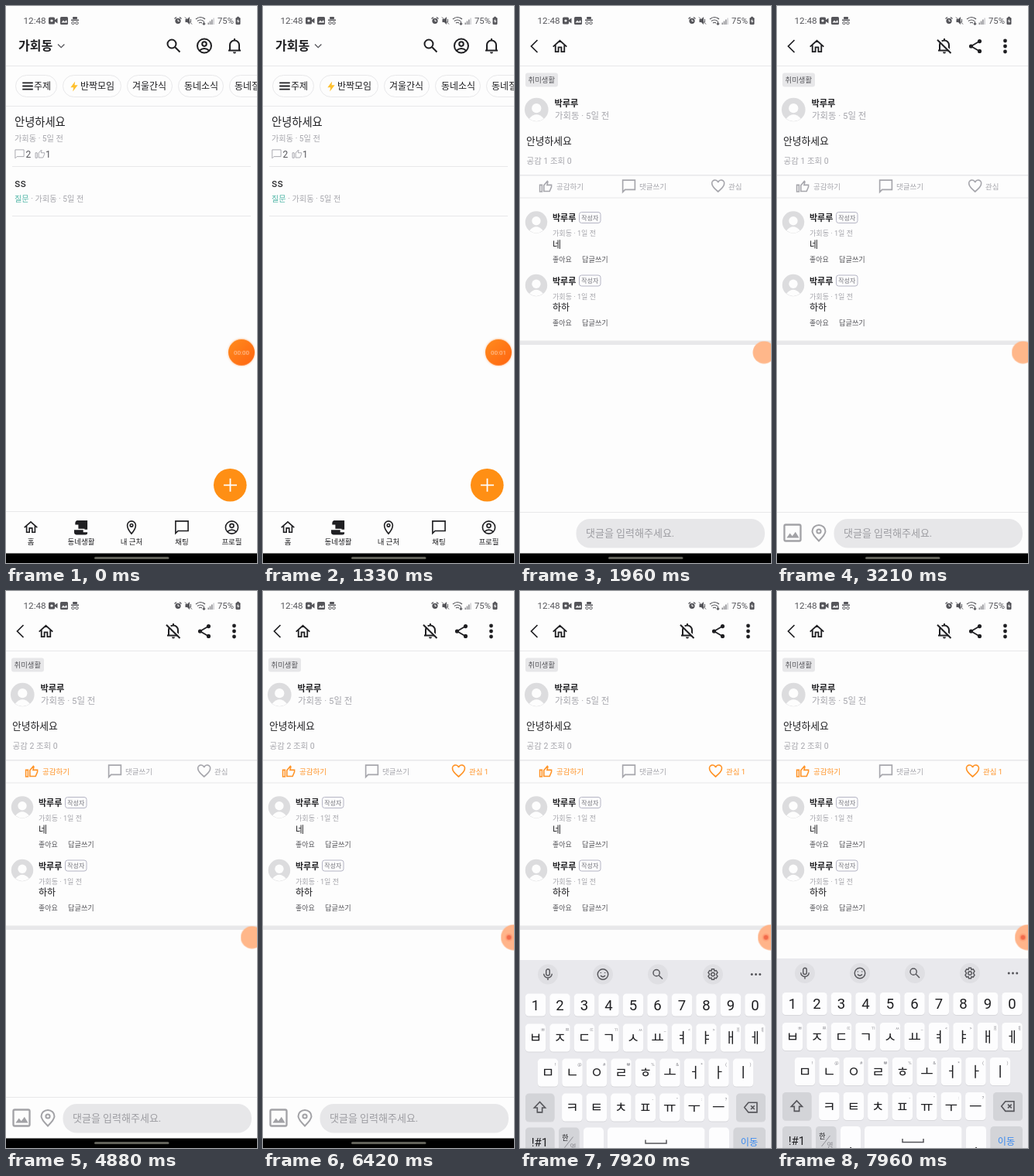
Animation of 324 by 720 pixels, one loop 8 s. Source, as an HTML page:

```html
<!DOCTYPE html>
<html lang="ko">
<head>
<meta charset="utf-8">
<style>
html, body { margin: 0; width: 100%; height: 100%; overflow: hidden; background: #fdfdfd; }
svg { display: block; width: 324px; height: 720px; }
text { font-family: Roboto, "Noto Sans CJK KR", "Noto Sans CJK", sans-serif; white-space: pre; }
</style>
</head>
<body>
<svg id="stage" viewBox="0 0 324 720"></svg>
<script>
const LOOP = 8000;
const BG = '#fdfdfd', INK = '#1f1f22', DIM = '#55555a', MUTE = '#a6a6ac', LINE = '#e8e8ea', PILL = '#e7e7e9', ORANGE = '#ff9326';
const NAME = '박루루';

// ---- drawing helpers ----
const text = (x, y, size, str, fill = INK, weight = 400, anchor = 'start') =>
  `<text x="${x}" y="${y}" font-size="${size}" fill="${fill}" font-weight="${weight}" text-anchor="${anchor}">${str}</text>`;
const box = (x, y, w, h, fill, r = 0, more = '') =>
  `<rect x="${x}" y="${y}" width="${w}" height="${h}" rx="${r}" fill="${fill}" ${more}/>`;
const disc = (x, y, r, fill, more = '') => `<circle cx="${x}" cy="${y}" r="${r}" fill="${fill}" ${more}/>`;
const path = (d, more = '') => `<path d="${d}" ${more}/>`;
const group = (id, body, more = '') => `<g id="${id}" ${more}>${body}</g>`;
const rule = (y, x = 0, w = 324, h = 1) => box(x, y, w, h, LINE);

// Icons live on a 24 unit grid and are stroked with the current colour.
const SOLID = 'fill="currentColor" stroke="none"';
const BELL = path('M6 18V11a6 6 0 0 1 12 0v7M4 18h16M12 2.5v2.5') + path('M10 20h4a2 2 0 0 1-4 0z', SOLID);
const ICONS = {
  search: disc(9.5, 9.5, 5.5, 'none') + path('M13.8 13.8 20 20'),
  user: disc(12, 12, 9, 'none') + disc(12, 9.6, 2.8, 'none') + path('M5.6 18.2Q12 12.8 18.4 18.2'),
  bell: BELL,
  bellOff: BELL + path('M4.5 3.2 21.5 20.2', `stroke="${BG}"`) + path('M3 4.2 20.5 21.5'),
  home: path('M2.8 12.2 12 4l9.2 8.2M6 10v9h4v-6h4v6h4v-9'),
  pin: path('M12 21C8 16.5 6 12.5 6 9a6 6 0 0 1 12 0c0 3.5-2 7.5-6 12z') + disc(12, 9, 2, 'none'),
  bigPin: path('M12 22C6.5 16.5 3.5 13 3.5 9.5a8.5 8 0 0 1 17 0c0 3.5-3 7-8.500 12.500z') + disc(12, 9.5, 2.6, 'none'),
  chat: path('M3 3h18v14H6.5L3 20.5z'),
  thumb: path('M2.5 10h3.5v10.5H2.5zM9 10.5 14.5 4l.8.8-1.3 5.2h7v3l-3 7H9z'),
  heart: path('M12 20C5 14 3 11.5 3 8.5A4.6 4.6 0 0 1 12 6.5 4.6 4.6 0 0 1 21 8.5C21 11.5 19 14 12 20z'),
  image: box(3, 3, 18, 18, 'none', 1.5) + path('M5.5 17.5l3.7-5 2.6 3.2 3.5-4.7 4 6.5z', SOLID),
  share: path('M18 5 6 12l12 7') + [[18, 5], [6, 12], [18, 19]].map(([x, y]) => disc(x, y, 2.8, 'currentColor', 'stroke="none"')).join(''),
  more: [5, 12, 19].map(y => disc(12, y, 2.4, 'currentColor', 'stroke="none"')).join(''),
  dots: [5, 12, 19].map(x => disc(x, 12, 2, 'currentColor', 'stroke="none"')).join(''),
  menu: path('M3 6.5h18M3 12h18M3 17.5h18'),
  bolt: path('M14 1 4 14h6.5L9 23 20 9h-7z', SOLID),
  scroll: path('M6 2h15v13h-4v-1H8V8H3.5Q3 3 6 2zM2 15.5h13V19h6v1q0 2.5-3 2.5H5Q2 22 2 19z', SOLID),
  mic: box(9, 3, 6, 11, 'none', 3) + path('M5 11a7 7 0 0 0 14 0M12 18v4'),
  smile: disc(12, 12, 9, 'none') + path('M8 14q4 4.5 8 0M8.5 8.5v1.5M15.5 8.5v1.5'),
  gear: path('M10 3h4l.7 3 3-.8 2.3 3.6L17.8 12l2.2 3.2-2.3 3.6-3-.8-.7 3h-4l-.7-3-3 .8L4 15.2 6.2 12 4 8.8l2.3-3.6 3 .8z') + disc(12, 12, 3, 'none'),
  shift: path('M12 3 3 12.5h5V20h8v-7.5h5z'),
  erase: path('M8 4h14v16H8L1.5 12zM12 9l6 6M18 9l-6 6')
};
const icon = (name, cx, cy, size = 24, color = INK, width = 2) => {
  const k = size / 24;
  return `<g transform="translate(${cx - 12 * k} ${cy - 12 * k}) scale(${k})" color="${color}" stroke="currentColor" fill="none" stroke-width="${width}">${ICONS[name]}</g>`;
};

// ---- shared chrome ----
function statusBar() {
  const c = DIM;
  return text(22.5, 22.8, 11.7, '12:48', c)
    + box(55, 14.5, 8, 9, c, 1.5) + path('M63 18l3.5-2.5v7L63 20z', `fill="${c}"`) + disc(59, 19, 1.6, BG)
    + box(70, 14, 10, 10, c, 1.5) + path('M71.5 21.5l2.5-3 2 2 2-2.5 1 3.5z', `fill="${BG}"`)
    + box(84, 17.5, 10, 1.5, c) + box(86, 14, 6, 3, c, 1) + disc(86.5, 22, 1.7, 'none', `stroke="${c}"`) + disc(91.5, 22, 1.7, 'none', `stroke="${c}"`)
    + disc(222, 19.3, 3.6, c) + path('M217.5 16.5l2.5-2M226.5 16.5l-2.5-2', `stroke="${c}" fill="none" stroke-width="1.300"`) + path('M222 17.3v2.200h1.800', `stroke="${BG}" fill="none"`)
    + path('M231.5 17h2.5l3-3v10l-3-3h-2.5z', `fill="${c}"`) + path('M231 14.5l9 9M238.5 17v4', `stroke="${c}" fill="none"`)
    + path('M245 17q6-5 12 0M247 19.5q4-3 8 0M249 22q2-1.5 4 0M255.5 20v4M253.8 22.5l1.7 1.7 1.7-1.7', `stroke="${c}" fill="none" stroke-width="1.2"`)
    + [0, 1, 2, 3].map(i => box(260.5 + i * 2.3, 21.5 - i * 2, 1.5, 2.5 + i * 2, i < 3 ? '#8b8b90' : '#cfcfd2')).join('')
    + text(273, 22.8, 11.3, '75%', c)
    + box(296.5, 15, 6, 9, c, 1.2) + box(298.2, 13.8, 2.6, 1.5, c) + path('M300 16l-2 4h1.5l-.5 3 2.2-4h-1.5z', `fill="${BG}"`);
}

// ---- list page ----
function listPage() {
  const chips = [[12, 54, 36, '주제'], [73, 76, 96, '반짝모임'], [156, 59, 163, '겨울간식'], [222, 59, 230, '동네소식'], [288, 59, 295, '동네질문']];
  const tabs = [['home', 32, '홈'], ['scroll', 97, '동네생활'], ['pin', 162, '내 근처'], ['chat', 227, '채팅'], ['user', 291.5, '프로필']];
  const place = '가회동 · 5일 전';
  return box(0, 30, 324, 678, BG)
    + text(16, 57, 16, '가회동', INK, 700)
    + path('M67 49.5l4.2 4.2 4.2-4.2', `fill="none" stroke="${DIM}" stroke-width="1.3"`)
    + icon('search', 216.5, 51.5) + icon('user', 256, 51.5) + icon('bell', 295, 51.5)
    + rule(77)
    + chips.map(([x, w, tx, s]) => box(x + .5, 89.5, w - 1, 28, BG, 14, `stroke="${LINE}"`) + text(tx, 108, 12, s)).join('')
    + icon('menu', 28, 103.5, 18, INK, 2.4) + icon('bolt', 88, 104, 14, '#ffc02e')
    + rule(129)
    + text(11, 155, 14.3, '안녕하세요') + text(11, 175, 10.2, place, MUTE)
    + icon('chat', 17.5, 191.5, 15, MUTE, 1.5) + text(25.5, 195.5, 12, '2', DIM)
    + icon('thumb', 44, 191, 15, MUTE, 1.5) + text(51, 195.5, 12, '1', DIM)
    + rule(207, 8, 308)
    + text(11, 233.5, 14.5, 'ss') + text(11, 252.5, 10.2, `<tspan fill="#4fb5a6">질문</tspan> · ${place}`, MUTE)
    + rule(271, 8, 308)
    + disc(289.3, 619.3, 21.3, '#ff8f14') + path('M281 619.3h17M289.5 610.8v17', `stroke="${BG}" stroke-width="1.8"`)
    + rule(653)
    + tabs.map(([n, x, s]) => icon(n, x, 674, 21.6, INK, 1.8) + text(x, 696, 9.5, s, INK, 400, 'middle')).join('');
}

// ---- detail page ----
const avatar = (x, y, r) => disc(x, y, r, '#dcdcde') + disc(x, y - r * .12, r * .4, BG)
  + path(`M${x - r * .62} ${y + r * .76}Q${x} ${y + r * .05} ${x + r * .62} ${y + r * .76}Q${x} ${y + r * 1.2} ${x - r * .62} ${y + r * .76}z`, `fill="${BG}"`);

const comment = (dy, body) => `<g transform="translate(0 ${dy})">`
  + avatar(21, 279.5, 14.2) + text(42, 278, 11, NAME, INK, 700)
  + box(76.5, 266.5, 27.5, 14, BG, 3, 'stroke="#b4b4c4"') + text(90.3, 276.5, 8, '작성자', '#77777f', 400, 'middle')
  + text(42, 297, 9.1, '가회동 · 1일 전', MUTE) + text(42, 312.5, 12, body)
  + text(42, 331, 9, '좋아요', DIM, 500) + text(80, 331, 9.2, '답글쓰기', DIM, 500) + '</g>';

const action = (name, x, tx, label, color, size = 21) => icon(name, x, 233, size, color, 1.9) + text(tx, 236.7, 9.5, label, color);

function detailPage() {
  const count = n => text(8.5, 204, 10.5, `공감 ${n} 조회 0`, MUTE);
  const hint = '댓글을 입력해주세요.';
  const TOOL = '#a2a2a6';
  return box(0, 30, 324, 678, BG)
    + path('M22.5 44l-8 8 8 8', `fill="none" stroke="${INK}" stroke-width="1.7"`)
    + icon('home', 51.5, 52.5, 23, INK, 1.9)
    + group('tools', icon('bellOff', 216, 51.5) + icon('share', 256, 52, 22, INK, 1.9) + icon('more', 294.5, 52))
    + rule(77)
    + box(7, 86.5, 42, 18, PILL, 3) + text(10.5, 99, 9.4, '취미생활', DIM, 500)
    + avatar(21.3, 134, 15.3) + text(44.5, 130, 11.2, NAME, INK, 700) + text(45, 146.3, 11.4, '가회동 · 5일 전', MUTE)
    + text(8, 179, 12.8, '안녕하세요')
    + group('count1', count(1)) + group('count2', count(2))
    + rule(218, 0, 324, 1.5) + rule(247.5)
    + group('likeOff', action('thumb', 33.3, 47, '공감하기', MUTE, 19.5))
    + group('likeOn', action('thumb', 33.3, 47, '공감하기', ORANGE, 19.5))
    + action('chat', 140.5, 154, '댓글쓰기', MUTE)
    + group('heartOff', action('heart', 255.7, 269, '관심', MUTE))
    + group('heartOn', action('heart', 252.5, 266, '관심 1', ORANGE))
    + comment(0, '네') + comment(81.5, '하하')
    + rule(432.5, 0, 324, 5.5)
    + rule(654)
    + group('field', box(73.5, 663, 243.5, 37.5, PILL, 18) + text(86, 686.3, 13, hint, '#9d9da2'))
    + group('attach', icon('image', 20, 681, 28, TOOL) + icon('bigPin', 54, 681.5, 24, TOOL))
    + group('editor', box(0, 600, 324, 108, BG)
      + box(-.5, 615.5, 325, 110, BG, 12, `stroke="${LINE}"`)
      + text(8.5, 645.3, 13, hint, '#b4b4b8') + box(9.3, 631, 1.6, 19, ORANGE)
      + icon('image', 25.5, 686.5, 27, TOOL) + icon('bigPin', 59, 687, 24, TOOL));
}

// ---- keyboard, drawn at its raised place ----
function keyboard() {
  const KEY = '#fdfdfe', DARK = '#d3d4d8', STEP = 31.5, HINT = '#8e8e94';
  const key = (x, y, w, h, fill = KEY) => box(x, y + 1, w, h, '#d8d8dc', 4.5) + box(x, y, w, h, fill, 4.5);
  const row = (chars, hints, cx, y, h, size) => [...chars].map((c, i) => {
    const x = cx + i * STEP;
    const tip = hints ? text(x + 9.5, y + 9, 6, hints[i], HINT, 400, 'middle') : '';
    return key(x - 13.2, y, 26.4, h) + text(x, y + h / 2 + size * .37, size, c, INK, 400, 'middle') + tip;
  }).join('');
  const tools = [['mic', 36], ['smile', 107], ['search', 178], ['gear', 249]];
  return box(0, 475, 324, 300, '#e9e9ed')
    + tools.map(([n, x]) => disc(x, 494, 13, '#dfdfe3') + icon(n, x, 494, 18, DIM, 1.9)).join('')
    + icon('dots', 304.5, 494, 18, DIM)
    + row('1234567890', null, 20, 519, 29, 18.5)
    + row('ㅂㅈㄷㄱㅅㅛㅕㅑㅐㅔ', ['ㅃ', 'ㅉ', 'ㄸ', 'ㄲ', 'ㅆ', '_', '&lt;', '&gt;', 'ㅒ', 'ㅖ'], 20, 558, 36, 18)
    + row('ㅁㄴㅇㄹㅎㅗㅓㅏㅣ', ['!', '@', '#', '₩', '%', '&amp;', '*', '(', ')'], 36, 603, 36, 18)
    + key(7, 648, 37.5, 36, DARK) + icon('shift', 25.5, 666, 19, DIM)
    + row('ㅋㅌㅊㅍㅠㅜㅡ', ['', '', '', '-', '"', ':', '?'], 67.3, 648, 36, 18)
    + key(279, 648, 38, 36, DARK) + icon('erase', 298, 666, 19, DIM)
    + key(7, 692, 37.5, 36, DARK) + text(25.5, 716, 15, '!#1', INK, 400, 'middle')
    + key(50, 692, 26.5, 36, DARK) + text(58.5, 708, 9, '한', INK, 400, 'middle') + text(68.5, 720, 9, '영', HINT, 400, 'middle') + path('M57.5 718l11-14', `stroke="${HINT}"`)
    + key(82, 692, 26, 36) + text(95, 721, 18, ',', INK, 400, 'middle')
    + key(113, 692, 125.5, 36) + path('M162 708v4.5h27V708', `fill="none" stroke="${DIM}" stroke-width="1.5"`)
    + key(244, 692, 26, 36) + text(257, 721, 18, '.', INK, 400, 'middle')
    + key(275.5, 692, 41.5, 36, DARK) + text(296, 715.5, 12.2, '이동', '#3a8af0', 400, 'middle');
}

// ---- floating recorder button, centred on its own origin ----
function recorder() {
  const label = s => text(0, 3, 8, s, '#ffd0b0', 400, 'middle');
  return group('bubble',
    group('ball', disc(0, 0, 20, 'url(#glow)') + disc(0, 0, 17, 'url(#fire)') + group('sec0', label('00:00')) + group('sec1', label('00:01')))
    + group('docked', disc(0, 0, 14.5, '#ffb78a'))
    + group('stop', disc(6, 0, 16.5, '#ffb48a') + disc(0, 0, 5, '#ffa27a') + disc(0, 0, 3, '#f26a4a')));
}

document.getElementById('stage').innerHTML =
  `<defs>
    <linearGradient id="fire" x1="0" y1="0" x2="1" y2="1"><stop stop-color="#ff8c1e"/><stop offset="1" stop-color="#ff6410"/></linearGradient>
    <radialGradient id="glow"><stop offset=".75" stop-color="#ffc49a"/><stop offset="1" stop-color="#ffe8d8" stop-opacity="0"/></radialGradient>
  </defs>`
  + box(0, 0, 324, 720, BG) + listPage() + group('detail', detailPage())
  + box(0, 0, 324, 30, BG) + statusBar()
  + box(0, 707.5, 324, 12.5, '#000') + box(114, 712, 96.5, 3, '#62625a', 1.5)
  + recorder() + group('keys', keyboard());

// ---- motion: steps are [ms, value, easing]; without easing the value holds ----
function move(id, prop, steps) {
  const all = [...steps, [LOOP, steps[steps.length - 1][1]]];
  const frames = all.map(([ms, value, easing = 'step-end']) => ({ offset: ms / LOOP, [prop]: value, easing }));
  document.getElementById(id).animate(frames, { duration: LOOP, iterations: Infinity });
}
const show = (id, from, to = LOOP) => {
  const steps = from > 0 ? [[0, 0], [from, 1]] : [[0, 1]];
  if (to < LOOP) steps.push([to, 0]);
  move(id, 'opacity', steps);
};

const OUT = 'cubic-bezier(.2,.7,.3,1)';
document.getElementById('detail').style.transformOrigin = '162px 370px';
move('detail', 'transform', [[0, 'scale(.86)'], [1460, 'scale(.86)', OUT], [1760, 'scale(1)']]);
move('detail', 'opacity', [[0, 0], [1460, 0, 'linear'], [1590, 1]]);

show('sec0', 0, 880);
show('sec1', 880);
move('ball', 'opacity', [[0, 1], [1760, 1, 'linear'], [1950, 0]]);
move('docked', 'opacity', [[0, 0], [1760, 0, 'linear'], [1950, 1], [5670, 0]]);
show('stop', 5670);
const at = x => `translate(${x}px, 447.7px)`;
move('bubble', 'transform', [[0, at(304)], [1760, at(304), 'ease-out'], [1960, at(315), 'linear'], [2130, at(317.5)]]);

show('tools', 2170);
show('attach', 2170);
move('field', 'transform', [[0, 'translate(-1px, 0px)'], [2170, 'translate(0px, 0px)']]);
show('count1', 0, 4330);
show('count2', 4330);
show('likeOff', 0, 4330);
show('likeOn', 4330);
show('heartOff', 0, 5920);
show('heartOn', 5920);
show('editor', 7710);
move('keys', 'transform', [[0, 'translate(0px, 250px)'], [7720, 'translate(0px, 250px)', OUT], [7960, 'translate(0px, 0px)']]);
</script>
</body>
</html>
```
